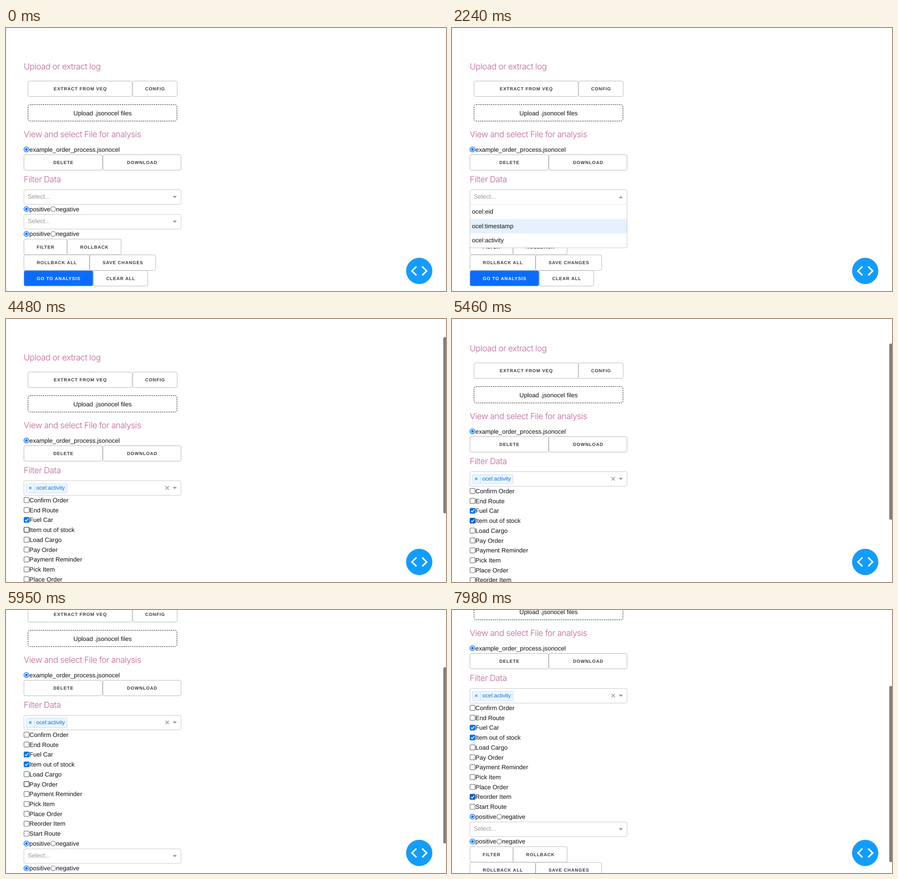
Animation of 969 by 578 pixels, one loop 8000 ms. Source, as an HTML page:

```html
<!DOCTYPE html>
<html lang="en">
<head>
<meta charset="utf-8">
<title>Log filter</title>
<style>
  html, body { margin: 0; width: 100%; height: 100%; overflow: hidden; background: #fff; }
  svg { display: block; width: 969px; height: 578px; }
  text { font: 13.57px "Liberation Sans", Arial, sans-serif; fill: #111; text-rendering: geometricPrecision; white-space: pre; }
  .head { font: 300 18.5px Inter, "Liberation Sans", sans-serif; letter-spacing: -.5px; fill: #c0629a; }
  .btn { font-size: 9.95px; font-weight: 700; letter-spacing: .905px; fill: #3c3c3c; text-anchor: middle; }
  .mid { text-anchor: middle; }
  .hint { fill: #999; }
  .tag { font-size: 12.2px; fill: #0a74d1; }
</style>
</head>
<body>
<svg id="stage" viewBox="0 0 969 578"></svg>
<script>
const LOOP = 8000, ROW = 21.74, BLUE = '#0873ea';
const stage = document.getElementById('stage');

function el(parent, name, attrs = {}, text) {
  const node = document.createElementNS('http://www.w3.org/2000/svg', name);
  set(node, attrs);
  if (text) node.textContent = text;
  return parent.appendChild(node);
}
function set(node, attrs) {
  for (const key in attrs) node.setAttribute(key, attrs[key]);
}
const group = parent => el(parent, 'g');
const show = (node, on) => { node.style.display = on ? '' : 'none'; };
const label = (parent, x, y, text, cls = '') => el(parent, 'text', { x, y, class: cls }, text);
const line = (parent, d, stroke, width = 1) =>
  el(parent, 'path', { d, stroke, fill: 'none', 'stroke-width': width });

function box(parent, x1, y1, x2, y2, attrs = {}) {
  return el(parent, 'rect', { x: x1, y: y1, width: x2 - x1, height: y2 - y1,
    rx: 3.5, fill: '#fff', stroke: '#b5b5b5', ...attrs });
}
function button(parent, x1, x2, y, text, primary) {
  box(parent, x1, y, x2, y + 34, primary ? { fill: '#0a6cff' } : {});
  const t = label(parent, (x1 + x2) / 2 + .45, y + 20.6, text, 'btn');
  if (primary) t.style.fill = '#fff';
}
function radio(parent, x, y, on) {
  el(parent, 'circle', { cx: x, cy: y, r: 5.4, fill: '#fff', stroke: on ? BLUE : '#767676', 'stroke-width': on ? 1.5 : 1.2 });
  if (on) el(parent, 'circle', { cx: x, cy: y, r: 2.9, fill: BLUE });
}
function signRow(parent, y) {
  radio(parent, 45, y, true);
  label(parent, 51.6, y + 4.8, 'positive');
  radio(parent, 104, y, false);
  label(parent, 110.2, y + 4.8, 'negative');
}
function select(parent, y) {
  const frame = box(parent, 39.5, y, 385.5, y + 32, { stroke: '#c6c6c6' });
  const hint = label(parent, 48, y + 19.3, 'Select...', 'hint');
  const arrow = el(parent, 'path', { fill: '#999', d: `M367 ${y + 13.5}h9.4l-4.7 4.7z` });
  return { frame, hint, arrow };
}
function checkbox(parent, y, text) {
  const square = box(parent, 39.6, y - 5.6, 50.8, y + 5.6, { rx: 1.6 });
  const tick = line(parent, `M42 ${y + .2}l2.4 2.5 4.4-5.4`, '#fff', 1.7);
  label(parent, 51.6, y + 4.8, text);
  return { square, tick };
}

// Page
const page = group(stage);
label(page, 39, 90.5, 'Upload or extract log', 'head');
button(page, 48.5, 278, 116.5, 'EXTRACT FROM VEQ');
button(page, 279, 377, 116.5, 'CONFIG');
box(page, 48.5, 168.5, 376.5, 204.5, { rx: 4.5, stroke: '#111', 'stroke-dasharray': '2.8 1.9' });
label(page, 212.7, 191.7, 'Upload .jsonocel files', 'mid');
label(page, 39, 240, 'View and select File for analysis', 'head');
radio(page, 45, 266.8, true);
label(page, 51.6, 271.6, 'example_order_process.jsonocel');
button(page, 39.5, 212.5, 278.5, 'DELETE');
button(page, 213.5, 385.5, 278.5, 'DOWNLOAD');
label(page, 39, 338.8, 'Filter Data', 'head');

const glow = box(page, 37.5, 353.8, 387.5, 389.2, { rx: 5, fill: 'none', stroke: '#e5f2ff', 'stroke-width': 3 });
const field = select(page, 355.5);

const tag = group(page);
box(tag, 44.5, 361.5, 134.5, 382.5, { rx: 2, fill: '#ebf5ff', stroke: '#c2e0ff' });
line(tag, 'M62.5 361.5v21', '#c2e0ff');
line(tag, 'M50.9 368.8l5 5m0-5l-5 5', '#0a74d1', 1.2);
label(tag, 66.7, 375.3, 'ocel:activity', 'tag');
const caret = line(page, 'M140.5 363v15', '#222', 1.2);
const clear = line(page, 'M351.2 367.4l7.6 7.6m0-7.6l-7.6 7.6', '#999', 1.6);

const list = group(page);
const checks = ['Confirm Order', 'End Route', 'Fuel Car', 'Item out of stock', 'Load Cargo', 'Pay Order',
  'Payment Reminder', 'Pick Item', 'Place Order', 'Reorder Item', 'Start Route']
  .map((text, i) => checkbox(list, 398 + i * ROW, text));

const lower = group(page);
signRow(lower, 398);
select(lower, 409.8);
signRow(lower, 452.5);
button(lower, 39.5, 134, 464, 'FILTER');
button(lower, 135, 253.5, 464, 'ROLLBACK');
button(lower, 39.5, 183.5, 498.7, 'ROLLBACK ALL');
button(lower, 184.5, 329.5, 498.7, 'SAVE CHANGES');
button(lower, 39.5, 191.5, 533, 'GO TO ANALYSIS', true);
button(lower, 192.5, 312, 533, 'CLEAR ALL');

const menu = group(page);
el(menu, 'path', { d: 'M39.5 387.5h346v92q0 3.5-3.5 3.5h-339q-3.5 0-3.5-3.5z', fill: '#fff', stroke: '#c6c6c6' });
line(menu, 'M40 387.5h345', '#e6e6e6');
const mark = el(menu, 'rect', { x: 40, width: 345, height: 31.6, fill: '#e5f1fd' });
['ocel:eid', 'ocel:timestamp', 'ocel:activity'].forEach((text, i) => label(menu, 44, 407.8 + i * 31.8, text));

// Fixed parts
el(stage, 'rect', { width: 1, height: 578, fill: '#eee' });
const thumb = el(stage, 'rect', { x: 963, width: 8, height: 387, rx: 3, fill: '#7f7f7f' });
el(stage, 'circle', { cx: 910, cy: 533.9, r: 28.6, fill: '#119dff', stroke: '#4a9fdc', 'stroke-width': .8 });
line(stage, 'M903.8 524.3l-9.8 9.6 9.8 9.6M916.6 524.3l9.8 9.6-9.8 9.6', '#fff', 3.4);

// Timelines: [time, value], held until the next entry
const every70 = (start, values) => values.map((v, i) => [start + i * 70, v]);
const scrollSteps = [
  ...every70(5390, [5, 20, 42, 63, 79.6, 94, 106, 116, 124, 130, 134]),
  ...every70(7770, [138, 149, 165, 183])];
const thumbSteps = [
  ...every70(2940, [.4, .8, 1]),
  ...every70(3430, [.9, .75, .6, .8, 1]),
  ...every70(6790, [.95, .7, .45, .2, 0]),
  [7770, 1]];
const markSteps = [[1610, 0], [2240, 1], [2450, 2], [2800, -1]];
const hoverSteps = [[0, -1], [3430, 3], [3570, 2], [4480, 3], [5530, 5], [6230, 9]];
const pressSteps = [[0, -1], [4130, 2], [4200, -1], [4900, 3], [5040, -1], [6860, 9], [6930, -1]];
const checkedAt = { 2: 4200, 3: 5040, 9: 6930 };

function at(steps, t, start = 0) {
  let value = start;
  for (const [time, v] of steps) if (t >= time) value = v;
  return value;
}
const between = (t, a, b) => t >= a && t < b;

function draw(t) {
  const scroll = at(scrollSteps, t);
  const picked = t >= 2800, listed = t >= 2940;
  const focused = between(t, 2800, 4130), open = between(t, 1610, 2800);
  set(page, { transform: `translate(0 ${-scroll})` });
  set(thumb, { y: 40 + scroll * .694, opacity: at(thumbSteps, t) });

  show(menu, open);
  set(mark, { y: 388 + 31.8 * Math.max(0, at(markSteps, t)) });
  set(field.arrow, { d: open ? 'M367 373.9h9.4l-4.7-4.7z' : 'M367 369h9.4l-4.7 4.7z' });
  set(field.frame, { stroke: focused ? '#1e8fd6' : '#c6c6c6' });
  show(field.hint, !picked);
  show(glow, focused);
  show(tag, picked);
  show(caret, between(t, 2870, 3430) || between(t, 3990, 4130));
  show(clear, listed);
  show(list, listed);
  set(lower, { transform: `translate(0 ${listed ? 11 * ROW : 0})` });

  const hover = at(hoverSteps, t), press = at(pressSteps, t);
  checks.forEach(({ square, tick }, i) => {
    const on = t >= checkedAt[i];
    const blue = i === hover ? '#0a5cc0' : BLUE;
    const edge = i === press ? '#8d8d8d' : i === hover ? '#3c3c3c' : '#707070';
    set(square, { fill: on ? blue : '#fff', stroke: on ? blue : edge, 'stroke-width': i === hover ? 1.4 : 1.2 });
    show(tick, on);
  });
}

const start = performance.now();
function tick() {
  draw((performance.now() - start) % LOOP);
  requestAnimationFrame(tick);
}
tick();
</script>
</body>
</html>
```
